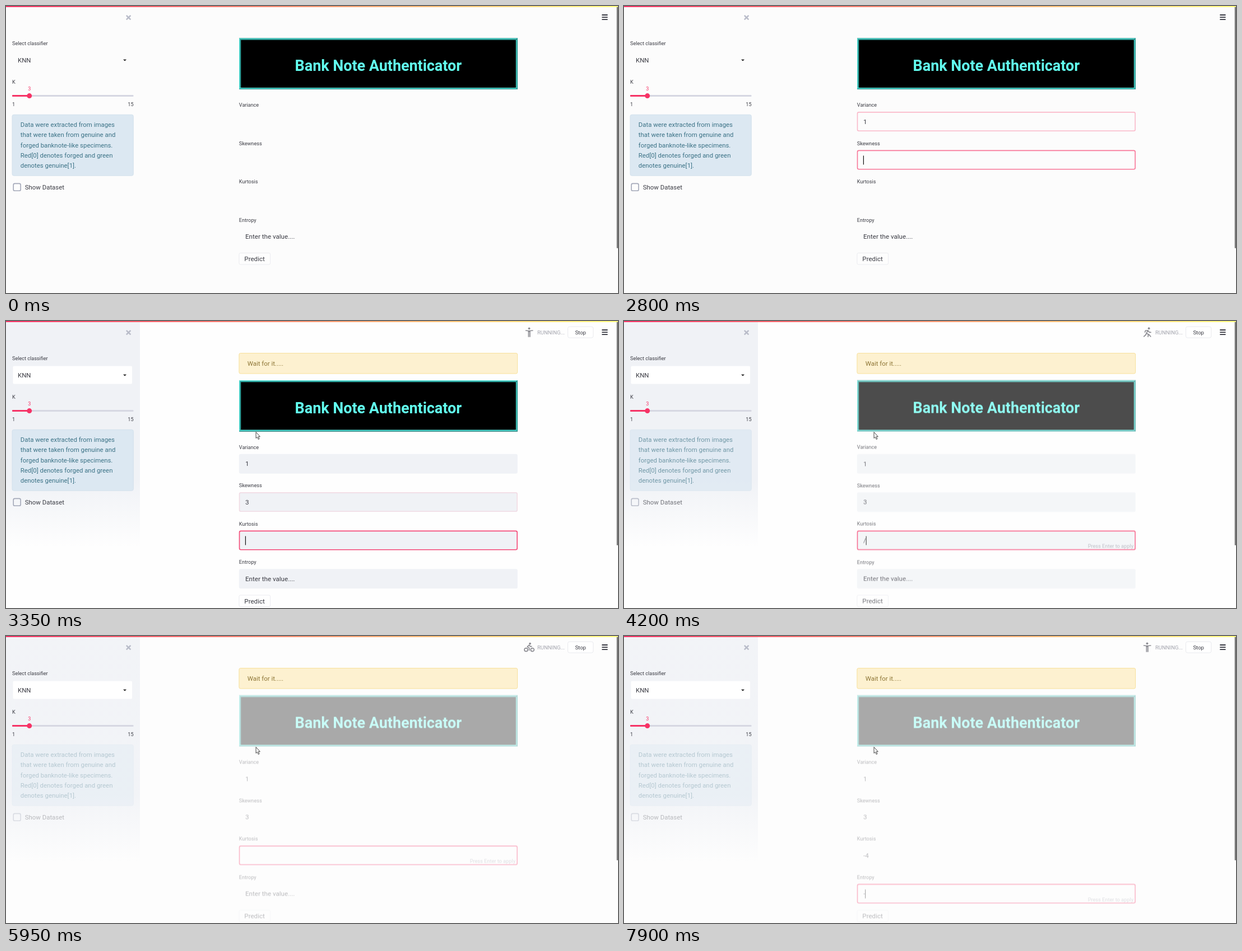
Write an HTML page that moves like this. It is 1092 px wide and 513 px high and loops after 8000 ms.

```html
<!DOCTYPE html>
<html lang="en">
<head>
<meta charset="utf-8">
<title>Bank Note Authenticator</title>
<style>
  html, body { margin: 0; width: 100%; height: 100%; overflow: hidden; background: #fcfcfc; }
  svg { display: block; width: 1092px; height: 513px; font: 11.4px Roboto, sans-serif; fill: #3b3c44; }
  .small { font-size: 9.1px; }
  .hint { font-size: 9.2px; fill: #a3a5b0; text-anchor: end; }
  .mid { text-anchor: middle; }
  .line { fill: none; stroke-linejoin: round; }
  .info { fill: #3b7286; }
</style>
</head>
<body>
<svg viewBox="0 0 1092 513">
  <defs>
    <linearGradient id="bar"><stop stop-color="#f63366"/><stop offset="1" stop-color="#fffd80"/></linearGradient>
    <linearGradient id="side" x2="0" y2="1">
      <stop offset=".7" stop-color="#f0f2f6"/><stop offset="1" stop-color="#f0f2f6" stop-opacity="0"/>
    </linearGradient>
  </defs>
  <rect id="page" width="1092" height="513"/>
  <rect id="sidebar" width="239" height="405" fill="url(#side)"/>
  <rect width="1092" height="2" fill="url(#bar)"/>
  <rect id="scroll" x="1089.7" y="1.5" width="2.3" rx="1" fill="#777"/>

  <path class="line" d="M214.8 16.8l7.6 7.6m0-7.6l-7.6 7.6" stroke="#b9bcc9" stroke-width="2.5"/>
  <path class="line" d="M1063.3 16h10.2m-10.2 4.1h10.2m-10.2 4.1h10.2" stroke="#33343e" stroke-width="1.8"/>

  <text class="small" x="11" y="70.2">Select classifier</text>
  <rect id="select" x="12.5" y="80.5" width="212.5" height="32" rx="2" fill="#fff"/>
  <text x="21" y="100.7">KNN</text>
  <path d="M209 95.4h6l-3 3.2z" fill="#222"/>
  <text class="small" x="11" y="138.6">K</text>
  <rect x="11" y="159" width="216.5" height="3" rx="1" fill="#d6d7e2"/>
  <rect x="11" y="159" width="31" height="3" rx="1" fill="#f63366"/>
  <circle cx="41.7" cy="160.6" r="4.5" fill="#f63366"/>
  <text class="small mid" x="41.7" y="151.4" style="fill:#f63366">3</text>
  <text class="small" x="11" y="178.7">1</text>
  <text class="small" x="227.5" y="178.7" text-anchor="end">15</text>

  <g id="sideStale">
    <rect x="11" y="194.3" width="216.3" height="109" rx="3" fill="#dce8f2" stroke="#cfdfeb" stroke-width=".8"/>
    <g id="info" class="info"></g>
    <rect class="line" x="13.2" y="317.4" width="12.9" height="12.9" rx="2.4" stroke="#a3a8b8" stroke-width="1.6"/>
    <text x="33.8" y="327.8">Show Dataset</text>
  </g>

  <g id="running">
    <path id="athlete" class="line" stroke="#8d8d93" stroke-width="1.7" stroke-linecap="round"/>
    <circle id="head" r="1.9" fill="#8d8d93"/>
    <text x="948" y="24.3" style="font-size:9.5px;fill:#a3a4ad">RUNNING...</text>
    <rect x="1002.5" y="10.2" width="45.3" height="19.8" rx="3" fill="#fff" stroke="#e4e5ea" stroke-width=".8"/>
    <text class="mid" x="1025.2" y="23.7" style="font-size:9.6px">Stop</text>
    <rect x="415.9" y="57.5" width="496.7" height="36.5" rx="2.5" fill="#fdf1d0" stroke="#f7dd92" stroke-width=".9"/>
    <text x="430.8" y="79.6" style="fill:#8c7434">Wait for it.....</text>
  </g>

  <g id="main">
    <rect x="416" y="57.5" width="497" height="91.5" fill="#000"/>
    <path class="line" d="M416.8 149V58.3H913M417.5 146.9H910.7V60" stroke="#55e8dd" stroke-width="1.7"/>
    <path class="line" d="M416 148.2H912.2V57.5M418.4 146V60H910" stroke="#2fa5a0" stroke-width="1.6"/>
    <text class="mid" x="664.3" y="116.3" style="font-size:26.9px;font-weight:700;fill:#62fff0">Bank Note Authenticator</text>
    <g id="fields"></g>
    <rect x="415.9" y="441.5" width="55.7" height="20.5" rx="2.5" fill="#fff" fill-opacity=".6" stroke="#e6e7ec" stroke-width=".8"/>
    <text class="mid" x="443.6" y="456" style="font-size:11.6px">Predict</text>
  </g>

  <path id="pointer" d="M0 0V11L2.4 8.9L4.2 13L6 12.2L4.2 8.2H7.3Z" fill="#fff" stroke="#333" stroke-width=".9"/>
</svg>
<script>
const LOOP = 8000, RERUN = 3300, FADE_START = 3600, FADE_TIME = 1000;
const FOCUS_TIME = 170, BLINK = 500, ROW = 68.5;
const PLACEHOLDER = 'Enter the value....';

// Focus changes: [time, field]
const focusChanges = [[1770, 0], [2730, 1], [3240, 2], [6740, 3]];
// Typed values: [time, field, value]
const edits = [
  [2600, 0, '1'], [3050, 1, '3'], [4150, 2, '/'], [5100, 2, ''],
  [6100, 2, '-'], [6400, 2, '-4'], [7700, 3, '-']
];
// Running indicator: [head x, head y, limbs]
const POSE_TIME = 194.5, POSE_ORIGIN = 5950;
const poses = [
  [935, 13.6, 'M931 24.6a3 3 0 1 1-6 0a3 3 0 1 1 6 0M942.3 24.6a3 3 0 1 1-6 0a3 3 0 1 1 6 0M938 18.6h-2.5l-2-2.4-3.3 3 3.4 2.2v4'],
  [937, 15, 'M935.5 18l-5 2.5 4 2.5-2 4M935 18l4 3M926.5 27.5h14'],
  [935.5, 13.3, 'M934 17l-1.5 5 3.5 2v4M932.5 22l-1.5 3.5h-3.5M929 20l1.5-3H934l2.5 3h3'],
  [936.6, 13.2, 'M934.8 16.8l-2.6 5 3.4 2.2-.6 4M932.2 22l-1.5 3-3 2.6M929.5 20l1-3 4.3-.2 2 3 3.2.6M936.5 24l3.2 3.8'],
  [933.5, 13.3, 'M927.6 17l4 .5h4l4.2-.5M932.4 17.6V28M934.8 17.6V28M932 19h3'],
  [933.5, 13.5, 'M933.5 17v5l-3.5 5.5M933.5 22l3.5 5.5M933.5 17.5l-4.5 3.5M933.5 17.5l4.5 3.5']
];

const $ = id => document.getElementById(id);
const clamp = v => Math.min(1, Math.max(0, v));
const easeOut = x => 1 - (1 - clamp(x)) ** 2;
const set = (el, attrs) => { for (const k in attrs) el.setAttribute(k, attrs[k]); };
const show = (el, on) => { el.style.display = on ? '' : 'none'; };

['Data were extracted from images', 'that were taken from genuine and',
 'forged banknote-like specimens.', 'Red[0] denotes forged and green',
 'denotes genuine[1].'].forEach((line, i) => {
  $('info').innerHTML += `<text x="25.8" y="${216.2 + i * 18.25}">${line}</text>`;
});

const fields = ['Variance', 'Skewness', 'Kurtosis', 'Entropy'].map((label, i) => {
  const g = document.createElementNS('http://www.w3.org/2000/svg', 'g');
  set(g, { transform: `translate(0 ${i * ROW})` });
  g.innerHTML = `<text class="small" x="415.8" y="180.4">${label}</text>
    <rect x="415.8" y="189.2" width="497" height="35" rx="3" fill="#f0f2f6"/>
    <rect class="line" x="416.5" y="189.9" width="495.6" height="33.4" rx="2.5" stroke="#f63366" stroke-width="1.6"/>
    <rect x="427" y="198.7" height="16.5" fill="#0078d7"/>
    <text x="427" y="210.7" style="font-size:11.6px"></text>
    <rect y="199" width="1.2" height="16" fill="#111"/>
    <text class="hint" x="909" y="220">Press Enter to apply</text>`;
  $('fields').append(g);
  const [, fill, border, selection, value, caret, hint] = g.children;
  return { fill, border, selection, value, caret, hint };
});

function drawField(field, i, t) {
  const start = focusChanges[i][0];
  const end = i < 3 ? focusChanges[i + 1][0] : Infinity;
  const focused = t >= start && t < end;
  const done = edits.filter(e => e[1] === i && e[0] <= t);
  const last = done[done.length - 1];
  const text = last ? last[2] : i === 3 ? PLACEHOLDER : '';
  const selected = focused && i === 3 && !last;
  const sinceInput = t - (last ? last[0] : start);

  if (field.value.textContent !== text) field.value.textContent = text;
  const width = text ? field.value.getComputedTextLength() : 0;
  field.value.style.fill = selected ? '#fff' : '';
  set(field.selection, { width });
  show(field.selection, selected);
  set(field.caret, { x: 426.8 + width });
  show(field.caret, focused && !selected && sinceInput % (2 * BLINK) < BLINK);
  show(field.hint, focused && last);
  show(field.fill, t >= RERUN && t < 4500);
  const glow = easeOut((t - start) / FOCUS_TIME) - easeOut((t - end) / FOCUS_TIME);
  set(field.border, { 'stroke-opacity': glow });
}

function drawPointer(t) {
  const entering = t >= 300 && t < 1400;
  show($('pointer'), entering || t >= RERUN);
  const p = easeOut((t - 300) / 750);
  const [x, y] = entering ? [400 + 45 * p, -8 + 194.5 * p] : [446, 198.5];
  set($('pointer'), { transform: `translate(${x} ${y})` });
}

function draw(t) {
  const rerun = t >= RERUN;
  const stale = 1 - 0.67 * clamp((t - FADE_START) / FADE_TIME) ** 1.6;
  set($('page'), { fill: !rerun ? '#fcfcfc' : t < 4500 ? '#fefefe' : '#fdfdfd' });
  set($('sidebar'), { opacity: t < 4500 ? 1 : 0.85 });
  set($('scroll'), { height: rerun ? 399.5 : 431.5 });
  for (const id of ['sidebar', 'select', 'running']) show($(id), rerun);
  set($('sideStale'), { opacity: stale });
  set($('main'), { opacity: stale, transform: `translate(0 ${rerun ? 48.5 : 0})` });

  const step = Math.floor((t - POSE_ORIGIN) / POSE_TIME);
  const [cx, cy, d] = poses[(step % 6 + 6) % 6];
  set($('head'), { cx, cy });
  set($('athlete'), { d });

  fields.forEach((field, i) => drawField(field, i, t));
  drawPointer(t);
}

const startTime = performance.now();
function tick() {
  draw((performance.now() - startTime) % LOOP);
  requestAnimationFrame(tick);
}
tick();
</script>
</body>
</html>
```
